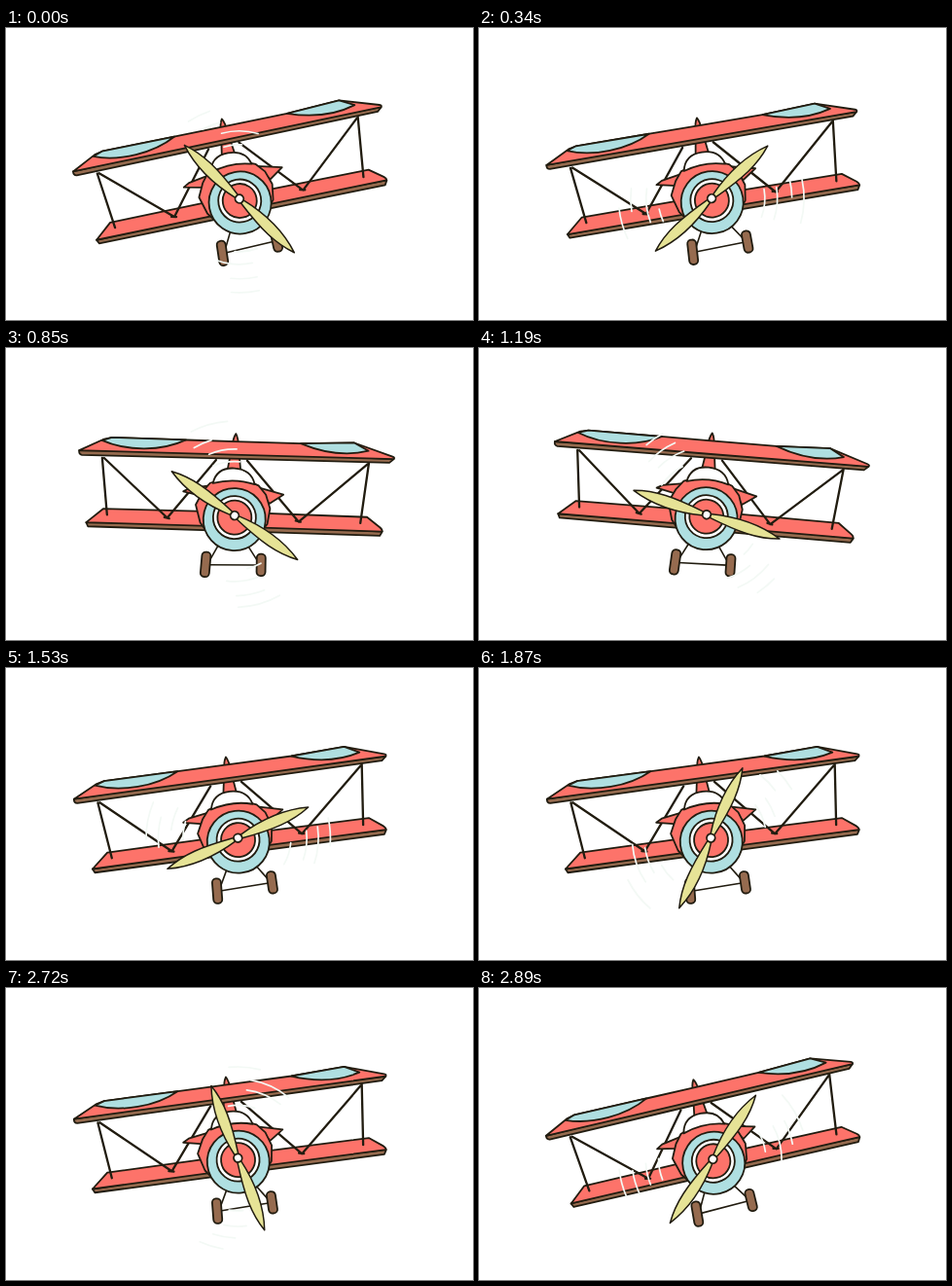
Write an HTML page that moves like this. It is 480 by 300 pixels and loops after 3060 ms.

```html
<!DOCTYPE html>
<html lang="en">
<head>
<meta charset="utf-8">
<title>Biplane</title>
<style>
  html, body { margin: 0; width: 100%; height: 100%; overflow: hidden; background: #fff; }
  svg { display: block; width: 100vw; height: 100vh; }
  .ink { stroke: #211c10; stroke-width: 1.8; stroke-linejoin: round; stroke-linecap: round; }
  .strut { fill: none; stroke-width: 2.3; }
  .thin { fill: none; stroke-width: 1.6; }
  .red { fill: #fd736a; }
  .blue { fill: #afdfe1; }
  .brown { fill: #966b4f; }
  .white { fill: #fff; }
  .yellow { fill: #e6e396; stroke-width: 1.5; }
  #streaks { fill: none; stroke: #f3f9f5; stroke-width: 1.7; }
</style>
</head>
<body>
<svg viewBox="0 0 480 300">
  <defs>
    <path id="blade" d="M3 -1.800C22 -6 52 -9 79 .5C58 7.500 38 7 3 1.800Z"/>
  </defs>
  <g id="plane" class="ink">
    <!-- lower wing -->
    <path class="brown" d="M84 188L86 192L235 189L386 186L388.500 181.500L235 182Z"/>
    <path class="red" d="M84 188L101 173L235 169.500L372 167.500L386 177.500Q389 180 388 181.500L235 184.500Z"/>

    <!-- struts -->
    <path class="strut" d="M97 121L105 179M99 121L167 179L214 117M371 112L365.500 174M370 113L302 176L246 116M164 178.500L169 179.500M299 175L304 176"/>

    <!-- landing gear -->
    <path class="thin" d="M221 204L213 220M251 203L261 217M212 225L262 222.500"/>
    <rect class="brown" x="204.300" y="212" width="9" height="25.500" rx="4" transform="rotate(2 209 225)"/>
    <rect class="brown" x="261.300" y="211" width="9" height="22.500" rx="4" transform="rotate(-2 266 222)"/>

    <!-- fuselage -->
    <path class="red" d="M233 89C235 92 236 96 236.500 104L240 128H226L229.500 104C230 96 231 92 233 89Z"/>
    <path class="red" d="M182 151L188 147.500L212 143L203 155Z"/>
    <path class="red" d="M259 143L285 149L271 159Z"/>
    <path class="red" d="M209 141Q235 130 259 141L267 150L272 164L270 180L258 196H212L201 182L195.500 164L202 150Z"/>
    <path class="white" d="M212 141C214 130 221 124.500 233 124.500C245 124.500 252 129 255 140Q234 134 212 141Z"/>

    <!-- upper wing -->
    <path class="brown" d="M73 114.500Q72.500 118.500 76 119L240 114.500L392 110.500L396.500 106.500L240 108Z"/>
    <path class="red" d="M73 114.500L98 101.500L106 99.500L184 98L233 97L300 95.500L355 92L395 104Q398 105 396 106.500L240 110.500Z"/>
    <path class="blue" d="M96 103L106 99.500L182 98C158 111 122 113 96 103Z"/>
    <path class="blue" d="M300 95.500L355 92L370 99.500Q338 109 300 95.500Z"/>

    <!-- cowl -->
    <circle class="blue" cx="236" cy="177" r="32"/>
    <circle class="white" cx="236" cy="175" r="22"/>
    <circle class="red" cx="236" cy="175" r="17.500"/>

    <g id="prop">
      <path id="streaks"/>
      <use href="#blade" class="yellow"/>
      <use href="#blade" class="yellow" transform="rotate(180)"/>
      <circle class="white" r="4.300"/>
    </g>
  </g>
</svg>
<script>
const STEP = 170, STEPS = 18;
const PIVOT = '252 153', HUB = '236 173';

// Key points as [step, degrees], joined by straight lines.
const tiltKeys = [[0, -10.4], [1, -10.4], [2, -8.35], [4, 0], [6, 6], [7, 6], [9, -6.4], [16, -6.4], [17, -11.75]];
const spinKeys = [[0, 44], [2, 316.5], [4, 493], [7, 738], [9, 876], [14, 1221], [17, 1383.5]];

const [plane, prop, streaks] = ['plane', 'prop', 'streaks'].map(id => document.getElementById(id));

function valueAt(keys, step) {
  const next = Math.max(1, keys.findIndex(([at]) => at >= step));
  const [[from, a], [to, b]] = [keys[next - 1], keys[next]];
  return a + (b - a) * (step - from) / (to - from);
}

function randomFrom(seed) {
  return () => {
    seed = (seed * 16807) % 2147483647;
    return seed / 2147483647;
  };
}

function arc(radius, start, sweep) {
  const point = degrees => {
    const a = degrees * Math.PI / 180;
    return `${radius * Math.cos(a)} ${radius * Math.sin(a)}`;
  };
  return `M${point(start)}A${radius} ${radius} 0 0 1 ${point(start + sweep)}`;
}

// Short arcs of air just ahead of each blade, scattered anew on every step.
function streakPath(step) {
  const random = randomFrom(7919 * (step + 1));
  let path = '';
  for (const blade of [0, 180]) {
    for (let radius = 54; radius < 95; radius += 13) {
      path += arc(radius + 4 * random(), blade + 10 + 25 * random(), 12 + 20 * random());
    }
  }
  return path;
}

let shown = -1;
function draw() {
  const step = Math.floor(performance.now() / STEP) % STEPS;
  if (step !== shown) {
    shown = step;
    const tilt = valueAt(tiltKeys, step);
    plane.setAttribute('transform', `rotate(${tilt} ${PIVOT})`);
    prop.setAttribute('transform', `translate(${HUB}) rotate(${valueAt(spinKeys, step) - tilt})`);
    streaks.setAttribute('d', streakPath(step));
  }
  requestAnimationFrame(draw);
}
draw();
</script>
</body>
</html>
```
